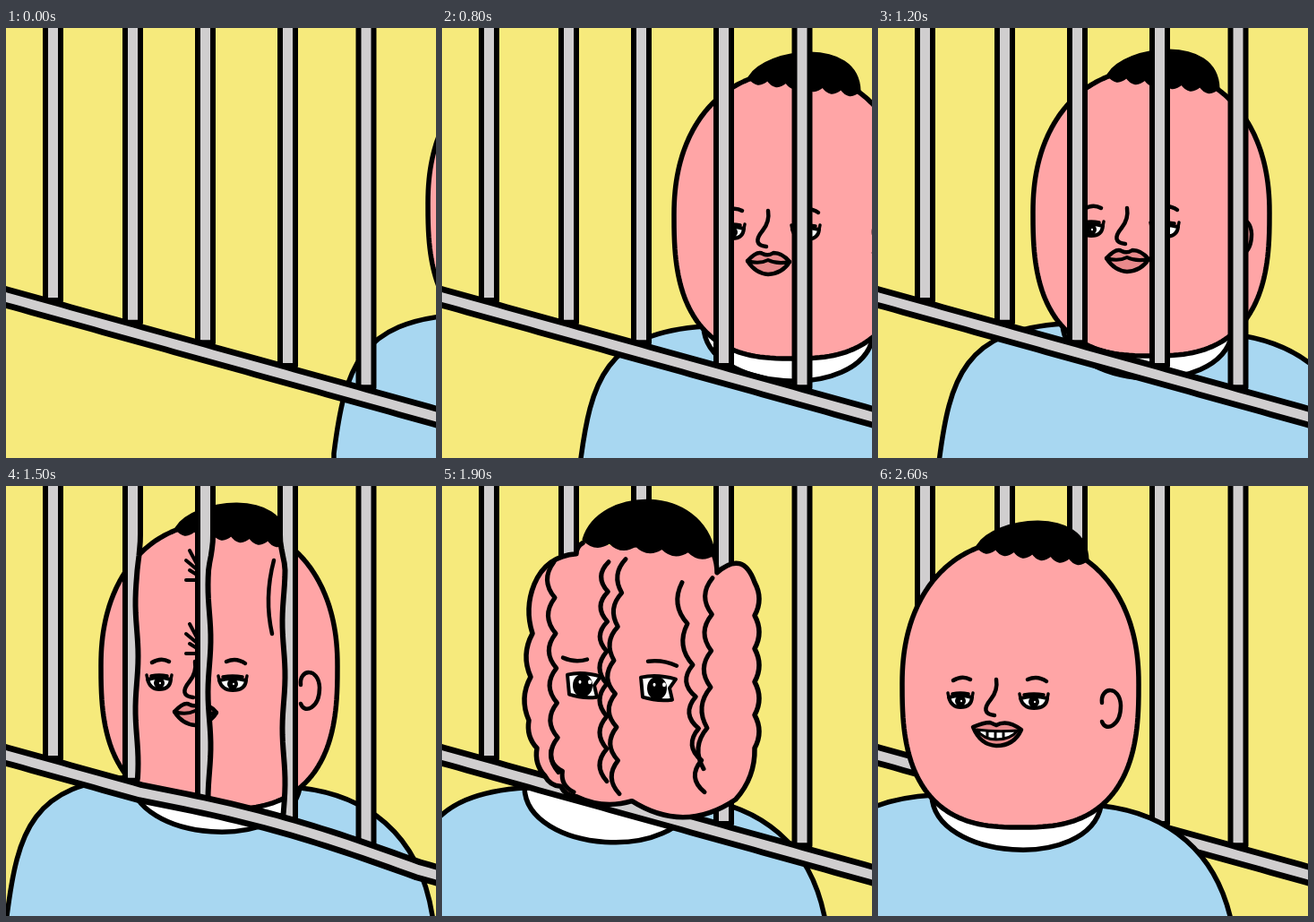
An HTML page with a canvas that plays this animation: 480 px wide and 480 px high, repeating every 3200 ms.

```html
<!DOCTYPE html>
<html lang="en">
<head>
<meta charset="utf-8">
<title>Through the bars</title>
<style>
html, body { margin: 0; width: 100%; height: 100%; overflow: hidden; background: #f6ea7c; }
canvas { display: block; width: 100vw; height: 100vh; }
</style>
</head>
<body>
<canvas id="stage" width="480" height="480"></canvas>
<script>
const ctx = document.getElementById('stage').getContext('2d');
const LOOP = 3200, STEP = 100;
const YELLOW = '#f6ea7c', BLUE = '#a8d7f1', PINK = '#ffa5a6', GREY = '#d0cecf',
      LIP = '#e88a8c', WHITE = '#fff', BLACK = '#000';
ctx.lineCap = ctx.lineJoin = 'round';

// Key poses: time and offset of the figure from its resting place
const POSES = [
  [0, 444, -25], [400, 357, -17], [600, 287, -20], [800, 232, -12], [1000, 188, -26],
  [1200, 146, -15], [1500, 79, -20], [1800, 48, -14], [2100, 0, 3], [2400, 0, 3], [2600, 0, 0]
];

function poseAt(t) {
  const next = POSES.findIndex(pose => pose[0] > t);
  if (next < 0) return [0, 0];
  const [t0, x0, y0] = POSES[next - 1], [t1, x1, y1] = POSES[next];
  const p = (t - t0) / (t1 - t0);
  return [x0 + (x1 - x0) * p, y0 + (y1 - y0) * p];
}

function ink(path, fill, width = 5.5) {
  if (fill) { ctx.fillStyle = fill; ctx.fill(path); }
  ctx.strokeStyle = BLACK;
  ctx.lineWidth = width;
  ctx.stroke(path);
}
const draw = (d, fill, width) => ink(new Path2D(d), fill, width);

function dot(x, y, rx, ry, fill) {
  ctx.fillStyle = fill;
  ctx.beginPath();
  ctx.ellipse(x, y, rx, ry, 0, 0, Math.PI * 2);
  ctx.fill();
}

function at(x, y, paint) {
  ctx.save();
  ctx.translate(x, y);
  paint();
  ctx.restore();
}

// Joined straight runs, each [x, y, bumps, depth], swelling to the right of travel
function bumpy(x, y, ...runs) {
  const path = new Path2D();
  path.moveTo(x, y);
  for (const [endX, endY, count, depth] of runs) {
    const dx = (endX - x) / count, dy = (endY - y) / count;
    const push = 2 * depth / Math.hypot(dx, dy);
    for (let i = 0; i < count; i++) {
      path.quadraticCurveTo(x + dx / 2 - dy * push, y + dy / 2 + dx * push, x + dx, y + dy);
      x += dx;
      y += dy;
    }
  }
  return path;
}

// Rounder above, squarer below
function headOutline() {
  const path = new Path2D();
  const bend = (v, n) => Math.sign(v) * Math.abs(v) ** (2 / n);
  for (let a = 0; a < 360; a += 2) {
    const c = Math.cos(a * Math.PI / 180), s = Math.sin(a * Math.PI / 180);
    const n = s < 0 ? 2.2 : 2.7;
    path.lineTo(159 + 132 * bend(c, n), 221 + 160 * bend(s, n));
  }
  path.closePath();
  return path;
}

const railY = x => 300.5 + 0.278 * x;

function drawBars(squeeze) {
  [52.5, 141.5, 222.5, 314.5, 402].forEach((x, i) => {
    const bent = i > 0 && i < 4 ? squeeze : 0;
    const end = railY(x) - 11;
    const edges = [[], []];
    for (let y = -10; y < end + 8; y += 8) {
      const press = bent * Math.min(1, Math.max(0, (y - 60) / 30)) * (4 + 1.5 * Math.sin(y / 19 + i));
      edges[0].push([x - 8.5 + (i === 3 ? press : 0), Math.min(y, end)]);
      edges[1].unshift([x + 8.5 - (i < 3 ? press : 0), Math.min(y, end)]);
    }
    const path = new Path2D();
    edges.flat().forEach(point => path.lineTo(...point));
    path.closePath();
    ink(path, GREY, 6);
  });

  const rail = new Path2D();
  for (let x = -20; x <= 500; x += 10) {
    const lift = x > 150 && x < 460 ? 8 * squeeze * Math.sin(Math.PI * (x - 150) / 310) : 0;
    rail.lineTo(x, railY(x) - lift);
  }
  ink(rail, null, 24);
  ctx.strokeStyle = GREY;
  ctx.lineWidth = 10.5;
  ctx.stroke(rail);
}

function drawBody() {
  draw('M-78 500C-66 405 -50 352 62 345L150 366L250 357C320 365 382 405 397 500V580H-78Z', BLUE);
  draw('M60 345C62 418 235 430 249 357Z', WHITE);
}

function drawHair(left, right, crown, bumps) {
  const path = bumpy(...left, [...right, bumps, 6]);
  path.bezierCurveTo(...crown, ...left);
  ink(path, BLACK, 3);
}

function drawEye(x, y, w) {
  at(x, y, () => {
    draw(`M${-w} -4Q0 -8 ${w} -4Q${w - 1} 7 0 7Q${3 - w} 7 ${-w} -4Z`, WHITE, 4);
    dot(0, 0, 6, 6, BLACK);
    dot(1, 0, 1, 1.3, WHITE);
    draw(`M${-w - 1} -9L${-w} -4M${w + 1} -9L${w} -4M${4 - w} -8Q0 -10 ${w - 4} -8`, null, 3.5);
  });
}

function drawMouth(smile) {
  if (smile) {
    draw('M106 269Q118 264 125 264L132 267Q144 260 160 272Q152 290 132 290Q114 289 106 269Z', LIP, 4.5);
    draw('M110 272Q132 275 156 273Q148 283 132 283Q118 283 110 272ZM122 274V281M131 274V282M140 274V281',
      WHITE, 3);
  } else {
    draw('M109 272Q120 260 126 264Q132 267 138 263Q148 263 156 273Q148 286 132 287Q118 286 109 272Z', LIP, 4.5);
    draw('M109 272Q122 276 132 271Q142 276 156 273', null, 4);
  }
}

function drawHead(smile) {
  ink(headOutline(), PINK);
  drawHair([111, 67], [234, 82], [232, 22, 130, 35], 6);
  draw('M84 217Q94 211 103 216M167 216Q178 211 188 218', null, 4.5);
  drawEye(92, 240, 13);
  drawEye(174, 241, 15);
  draw('M132 216Q134 228 126 238Q113 254 130 256', null, 4.5);
  drawMouth(smile);
  draw('M250 242C248 224 270 222 271 245C271 268 254 275 250 263', null, 4.5);
}

function drawPressMarks() {
  for (const y of [72, 154])
    for (let i = 0; i < 4; i++)
      draw(`M${i % 2 ? 201 : 205} ${y + i * 11}L213 ${y + 15 + i * 6}`, null, 4);
  draw('M299 83Q288 125 297 165', null, 4.5);
}

function drawStartledEye(x, y, w) {
  at(x, y, () => {
    draw(`M${-w} -12Q0 -16 ${w + 3} -10L${w - 4} 0L${w - 1} 13Q0 15 ${2 - w} 10Z`, WHITE, 4);
    dot(0, 0, 11, 13, BLACK);
    dot(-3, -4, 1.5, 2, WHITE);
    dot(8, -4, 2, 2.5, WHITE);
  });
}

function drawSqueezedHead() {
  ink(bumpy(157, 64, [150, 76, 1, 2], [103, 110, 1, 9], [101, 165, 1, 5], [97, 262, 2, 6],
    [115, 324, 2, 4], [150, 347, 2, 3], [212, 352, 1, 6], [328, 350, 1, 19], [349, 293, 1, 6],
    [349, 108, 5, 5], [307, 97, 1, 16], [303, 76, 1, 1]), PINK);
  drawHair([158, 60], [304, 76], [290, -3, 175, 2], 5);
  draw('M135 192Q148 198 162 194M230 196Q247 194 262 201', null, 4.5);
  drawStartledEye(157, 223, 17);
  drawStartledEye(240, 226, 18);
  const creases = [
    [125, 85, [127, 165, 2, 8], [130, 320, 4, 8]],
    [122, 295, [147, 342, 2, 5]],
    [186, 85, [184, 185, 3, 8], [184, 330, 4, 8]],
    [205, 82, [192, 195, 3, 7], [198, 344, 4, 8]],
    [268, 108, [280, 200, 2, 8], [293, 342, 4, 9]],
    [302, 103, [300, 225, 3, 8], [292, 316, 2, 8]]
  ];
  creases.forEach(crease => ink(bumpy(...crease), null, 5));
}

function render(time) {
  const t = Math.floor((time % LOOP) / STEP) * STEP;
  const [x, y] = poseAt(t);
  ctx.fillStyle = YELLOW;
  ctx.fillRect(0, 0, 480, 480);

  if (t < 1800) {
    at(x, y, () => { drawBody(); drawHead(false); });
    if (t >= 1500) drawPressMarks();
    drawBars(Math.min(1, Math.max(0, (t - 1300) / 200)));
  } else if (t < 2100) {
    at(x, y, drawBody);
    drawBars(0);
    at(x - 32, y + 8, drawSqueezedHead);
  } else {
    drawBars(0);
    at(x, y, () => { drawBody(); drawHead(t >= 2500); });
  }
}

let start;
function tick(now) {
  start ??= now;
  render(now - start);
  requestAnimationFrame(tick);
}
render(0);
requestAnimationFrame(tick);
</script>
</body>
</html>
```
